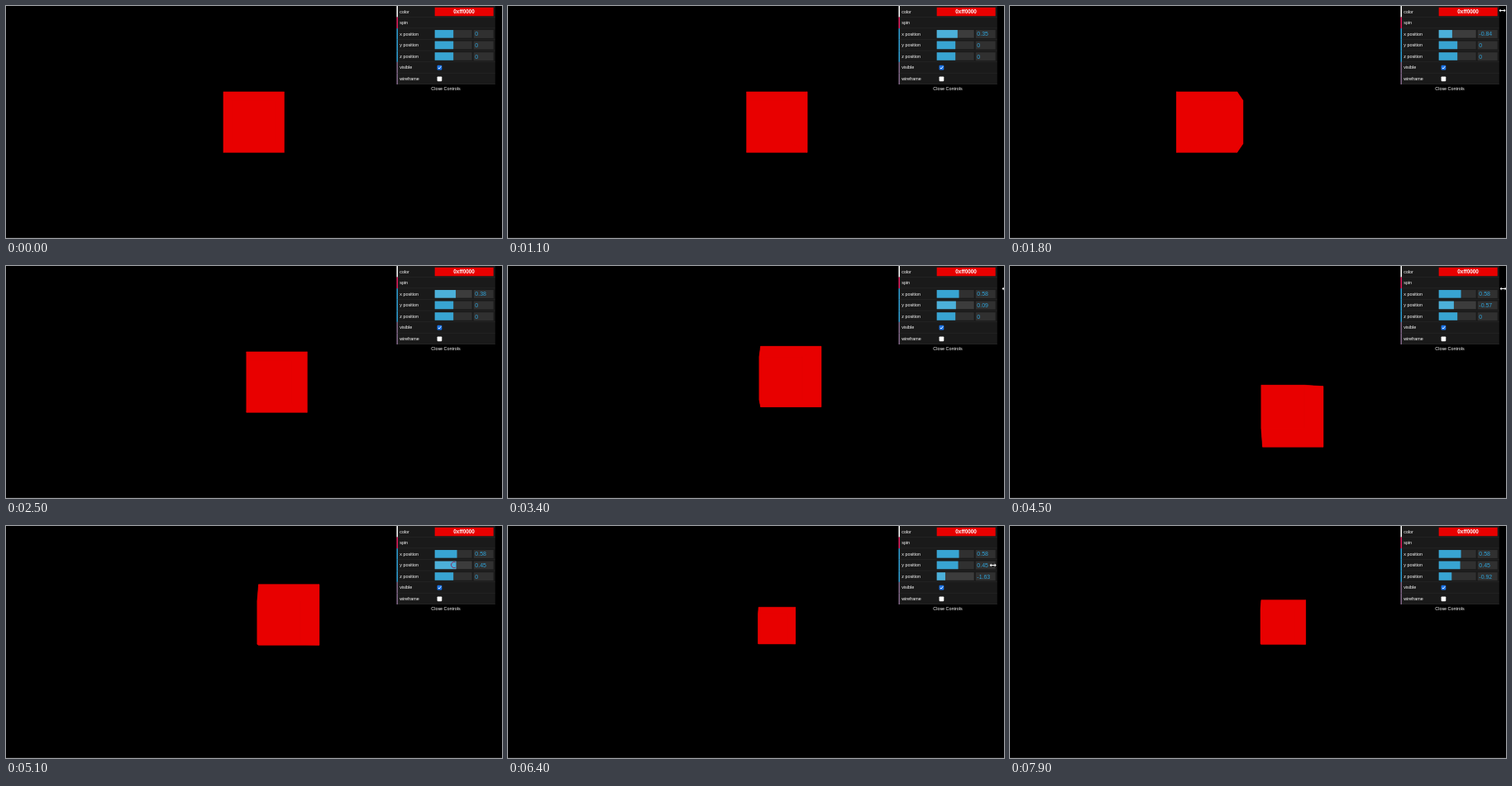
Recreate the animation shown at these times as an HTML page. Size 600 px wide and 281 px high, loop 8000 ms.

```html
<!DOCTYPE html>
<html lang="en">
<head>
<meta charset="utf-8">
<title>Cube controls</title>
<style>
html, body { margin: 0; width: 100%; height: 100%; overflow: hidden; background: #000; }
svg { display: block; width: 100vw; height: 100vh; }
text { font: 5.4px "Liberation Sans", Arial, sans-serif; fill: #fff; }
.value { font-size: 7px; fill: #2fa1d6; }
.hex { font-size: 6.4px; font-weight: bold; text-anchor: middle; }
.close { text-anchor: middle; }
</style>
</head>
<body>
<svg viewBox="0 0 600 281">
  <rect width="600" height="281" fill="#000"/>
  <rect y="280" width="600" height="1" fill="#141414"/>
  <g id="cube" fill="#e80000" stroke="#e80000" stroke-width=".3"></g>
  <g id="panel"></g>
  <path id="ring" d="M543.6 43.8A3.6 3.6 0 1 0 543.6 50.4" fill="none" stroke="#8c2a5c"/>
  <path id="cursor" d="M-4 0L-2 -1.9V-.4H2V-1.9L4 0L2 1.9V.4H-2V1.9Z" fill="#fff"/>
</svg>
<script>
const LOOP = 8000, STEP = 100;
const ROW = 95 / 7, LEFT = 472.8, TRACK = 518.7, TRACK_W = 45, RANGE = 3;
const FOCAL = 183.5, CAMERA = 3, CX = 299.7, CY = 140.6;
const RED = '#e80000', BLUE = '#38a4d2', GRAY = '#303030';

// turns: [ms, value] where the drag changes direction; dx, cy: pointer offset and height
const axes = [
  { name: 'x', dx: 60.7, cy: 5.5,
    turns: [[200, 0], [800, .35], [1200, .35], [2050, -1.14], [2670, .7], [3000, .58]] },
  { name: 'y', dx: 59.7, cy: 27.5,
    turns: [[3300, 0], [3650, .5], [4125, -1.5], [4900, .45]] },
  { name: 'z', dx: 57.7, cy: 47.5,
    turns: [[5800, 0], [6700, -2.17], [7500, -.92]] }
];

const $ = id => document.getElementById(id);
function add(parent, tag, attrs, text) {
  const el = document.createElementNS('http://www.w3.org/2000/svg', tag);
  for (const k in attrs) el.setAttribute(k, attrs[k]);
  if (text) el.textContent = text;
  return parent.appendChild(el);
}
const panel = $('panel');
const box = (x, y, width, height, fill, rx = 0) =>
  add(panel, 'rect', { x, y, width, height, fill, rx });
const label = (x, y, text, cls = '') => add(panel, 'text', { x, y, class: cls }, text);

function addRow(i, name, color) {
  const y = i * ROW;
  box(LEFT, y + ROW - .5, 119, .5, '#2a2a2a');
  box(LEFT - .3, y, 1.5, ROW, color);
  label(476.2, y + 8.5, name);
}

function buildPanel() {
  box(LEFT, 0, 119, 95, '#1a1a1a');
  addRow(0, 'color', '#fff');
  box(TRACK, 1.8, 71, 10.4, RED);
  label(554.1, 9.2, '0xff0000', 'hex');
  addRow(1, 'spin', '#e61d5f');
  axes.forEach((a, i) => {
    const y = (i + 2) * ROW + 1.9;
    addRow(i + 2, a.name + ' position', '#2fa1d6');
    a.track = box(TRACK, y, TRACK_W, 9.6, GRAY);
    a.fill = box(TRACK, y, 0, 9.6, BLUE);
    box(565.7, y, 24, 9.9, GRAY);
    a.text = label(567.3, y + 7.4, '0', 'value');
  });
  ['visible', 'wireframe'].forEach((name, i) => {
    addRow(5 + i, name, '#806787');
    box(521.6, (5 + i) * ROW + 4, 5.7, 5.7, i ? '#fff' : '#1a73e8', .8);
  });
  add(panel, 'path', { d: 'M522.8 74.8L524 76L526.3 73.2', fill: 'none', stroke: '#fff', 'stroke-width': .9 });
  label(532, 101.5, 'Close Controls', 'close');
}

const ease = p => (1 - Math.cos(Math.PI * p)) / 2;

function sample(turns, t) {
  const next = turns.findIndex(k => t <= k[0]);
  if (next === 0) return turns[0][1];
  if (next < 0) return turns[turns.length - 1][1];
  const [t0, v0] = turns[next - 1], [t1, v1] = turns[next];
  return v0 + (v1 - v0) * ease((t - t0) / (t1 - t0));
}

const faces = Array.from({ length: 6 }, () => add($('cube'), 'polygon', {}));
function drawCube(x, y, z) {
  const corners = depth => {
    const s = FOCAL / (CAMERA - z - depth);
    return [[-.5, .5], [.5, .5], [.5, -.5], [-.5, -.5]]
      .map(([u, v]) => [CX + (x + u) * s, CY - (y + v) * s]);
  };
  const front = corners(.5), back = corners(-.5);
  const sides = front.map((p, i) => {
    const j = (i + 1) % 4;
    return [p, front[j], back[j], back[i]];
  });
  [front, back, ...sides].forEach((f, i) => faces[i].setAttribute('points', f.join(' ')));
}

function draw(now) {
  const t = Math.floor(now % LOOP / STEP) * STEP;
  const showRing = t >= 5000 && t < 5300;
  const pos = [];
  let pointer = null;
  for (const a of axes) {
    const v = Math.round(sample(a.turns, t) * 100) / 100;
    const width = TRACK_W / 2 * (1 + v / RANGE);
    const dragged = t > a.turns[0][0] && t < a.turns[a.turns.length - 1][0];
    const lit = dragged || (showRing && a.name === 'y');
    pos.push(v);
    a.fill.setAttribute('width', width);
    a.fill.setAttribute('fill', lit ? '#4cb0d9' : BLUE);
    a.track.setAttribute('fill', lit ? '#3c3c3c' : GRAY);
    a.text.textContent = String(v || 0);
    if (dragged) pointer = [TRACK + width + a.dx, a.cy];
  }
  drawCube(...pos);
  $('cursor').style.display = pointer ? '' : 'none';
  if (pointer) $('cursor').setAttribute('transform', `translate(${pointer})`);
  $('ring').style.display = showRing ? '' : 'none';
}

buildPanel();
const start = performance.now();
function tick() {
  draw(performance.now() - start);
  requestAnimationFrame(tick);
}
tick();
</script>
</body>
</html>
```
